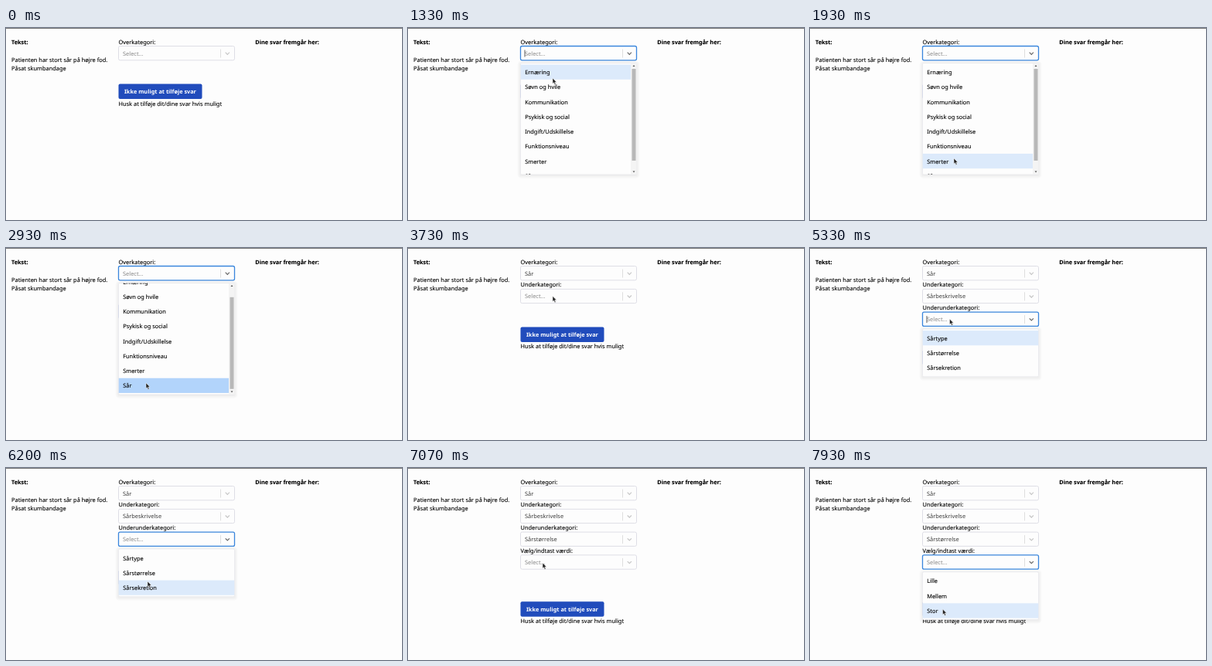
An HTML page that plays this animation: 512x249 px, repeating every 8 s.

```html
<!DOCTYPE html>
<html lang="da">
<head>
<meta charset="utf-8">
<title>Kategorivalg</title>
<style>
html, body { margin: 0; width: 100%; height: 100%; overflow: hidden; background: #fdfdfd; }
#stage { display: block; width: 100%; height: 100%; }
text { font: 7.42px "Noto Sans", "Open Sans", sans-serif; fill: #000; stroke: #000; stroke-width: .1px; text-rendering: geometricPrecision; }
.bold { font-weight: 700; font-size: 7.33px; }
.hint { fill: #868686; stroke: none; }
.value { fill: #3c3c3c; stroke: none; }
.on-button { fill: #fff; stroke: none; }
</style>
</head>
<body>
<svg id="stage" viewBox="0 0 512 249" xmlns="http://www.w3.org/2000/svg"></svg>
<script>
const LOOP = 8000;
const BLINK = 1200;
const ROW = 19.25;
const LEFT = 145.5;
const WIDTH = 150;
const PAPER = '#fdfdfd';
const stage = document.getElementById('stage');

// show: field appears, open/done: menu opens/closes, press: mouse button goes down
const fields = [
  { label: 'Overkategori:', show: 0, open: 860, press: 2860, done: 3150, pick: 7,
    options: ['Ernæring', 'Søvn og hvile', 'Kommunikation', 'Psykisk og social',
      'Indgift/Udskillelse', 'Funktionsniveau', 'Smerter', 'Sår'] },
  { label: 'Underkategori:', show: 3150, open: 3900, press: 4680, done: 4960, pick: 0,
    options: ['Sårbeskrivelse', 'Sårpleje'] },
  { label: 'Underunderkategori:', show: 4960, open: 5300, press: 6490, done: 6690, pick: 1,
    options: ['Sårtype', 'Sårstørrelse', 'Sårsekretion'] },
  { label: 'Vælg/indtast værdi:', show: 6690, open: 7100, press: LOOP, done: LOOP, pick: 2,
    options: ['Lille', 'Mellem', 'Stor'] }
].map((field, i) => ({ ...field, top: 23.5 + i * 29.8 }));

// time, x, y of the pointer tip
const path = [
  [150, 262, 150], [700, 205, 36], [950, 203, 37], [1330, 187, 65], [1930, 186, 169],
  [2250, 184, 181], [2500, 183, 181], [2800, 181, 175], [3200, 181, 175], [3750, 187, 62],
  [3950, 187, 62], [4400, 180.5, 92], [5350, 180.5, 92], [6000, 183, 147], [6220, 183, 147],
  [6430, 177, 138], [6750, 177, 138], [7000, 174, 123], [7170, 174, 123], [7780, 171.5, 183]
];

const ease = u => u * u * (3 - 2 * u);

function pointerAt(t) {
  if (t < path[0][0]) return null;
  const next = path.findIndex(key => key[0] > t);
  if (next < 0) return path[path.length - 1].slice(1);
  const [t0, x0, y0] = path[next - 1];
  const [t1, x1, y1] = path[next];
  const u = ease((t - t0) / (t1 - t0));
  return [x0 + (x1 - x0) * u, y0 + (y1 - y0) * u];
}

const text = (x, y, s, cls = '') => `<text x="${x}" y="${y}" class="${cls}">${s}</text>`;
const rect = (x, y, w, h, fill, more = '') =>
  `<rect x="${x}" y="${y}" width="${w}" height="${h}" fill="${fill}" ${more}/>`;
const line = (d, color, width) =>
  `<path d="${d}" fill="none" stroke="${color}" stroke-width="${width}"/>`;

function drawField(field, t) {
  const { top } = field;
  const open = t >= field.open && t < field.done;
  const done = t >= field.done;
  const border = open ? '#3a86dc' : '#dedee6';
  const arrow = open ? '#666' : '#c6c6c6';
  const caret = open && (t - field.open) % BLINK < BLINK / 2;
  return text(LEFT, top - 3, field.label) +
    rect(LEFT, top, WIDTH, 18.3, PAPER, `rx="2" stroke="${border}" stroke-width="${open ? 1.3 : 1}"`) +
    text(151, top + 12, done ? field.options[field.pick] : 'Select...', done ? 'value' : 'hint') +
    line(`M277.5 ${top + 4}v11`, '#d6d6d6', 0.8) +
    line(`M283.7 ${top + 8.2}l2.6 2.6l2.6-2.6`, arrow, 1.2) +
    (caret ? line(`M151 ${top + 5}v9`, '#333', 0.8) : '');
}

function drawScrollbar(height, scroll) {
  const thumb = 7.5 + scroll * 0.8;
  return rect(142.5, 0, 8, height, '#f4f4f4') +
    rect(144, thumb, 5, 119, '#b8b8b8') +
    `<path d="M145 4.5l1.5-2l1.5 2zM145 ${height - 4.5}l1.5 2l1.5-2z" fill="#555"/>`;
}

// soft shadow that falls slightly downwards
const drawShadow = (top, height) => [4, 2.5, 1].map(d =>
  rect(LEFT - d, top + 1 - d, WIDTH + 2 * d, height + 2 * d, '#000', `rx="${d + 1}" opacity=".018"`)
).join('');

function drawMenu(field, t, pointer) {
  const top = field.top + 22;
  const full = field.options.length * ROW + 4;
  const height = Math.min(full, 144.5);
  const long = full > height;
  const scroll = long && t >= 2500 ? full - height : 0;
  const inside = pointer && pointer[1] >= top && pointer[1] < top + height;
  const row = inside ? Math.floor((pointer[1] - top - 2 + scroll) / ROW) : 0;
  const hover = Math.max(0, Math.min(field.options.length - 1, row));
  const fill = t >= field.press ? '#b2d4fb' : '#dceafb';
  const rows = field.options.map((name, i) => {
    const y = 2 + i * ROW - scroll;
    return (i === hover ? rect(0, y, long ? 142.5 : WIDTH, ROW, fill) : '') +
      text(5.7, y + 12.6, name);
  }).join('');
  return drawShadow(top, height) +
    rect(LEFT, top, WIDTH, height, PAPER, 'rx="1.5" stroke="#e4e4ea" stroke-width=".6"') +
    `<svg x="${LEFT}" y="${top}" width="${WIDTH}" height="${height}" overflow="hidden">` +
    rows + (long ? drawScrollbar(height, scroll) : '') + '</svg>';
}

function drawButton(count) {
  const y = 72.5 + (count - 1) * 29.9 + (count === 4 ? 11 : 0);
  return rect(145.5, y, 108, 19.5, '#214cbc', 'rx="2"') +
    text(153, y + 12.5, 'Ikke muligt at tilføje svar', 'bold on-button') +
    text(LEFT, y + 28, 'Husk at tilføje dit/dine svar hvis muligt');
}

const drawPointer = ([x, y]) =>
  `<path transform="translate(${x} ${y})" d="M0 0v7.2l1.6-1.5l1.2 2.7l1.3-.6l-1.2-2.6h2.2z"
    fill="#222" stroke="#fff" stroke-width=".5"/>`;

function draw(t) {
  const shown = fields.filter(field => t >= field.show);
  const active = fields.find(field => t >= field.open && t < field.done);
  const pointer = pointerAt(t);
  stage.innerHTML = rect(0, 0, 512, 249, PAPER) +
    rect(0, 0, 512, 1, '#777') +
    text(7, 20.5, 'Tekst:', 'bold') +
    text(7, 43.6, 'Patienten har stort sår på højre fod.') +
    text(7, 55, 'Påsat skumbandage') +
    text(322.3, 20.5, 'Dine svar fremgår her:', 'bold') +
    drawButton(shown.length) +
    shown.map(field => drawField(field, t)).join('') +
    (active ? drawMenu(active, t, pointer) : '') +
    (pointer ? drawPointer(pointer) : '');
}

const start = performance.now();
function tick() {
  draw((performance.now() - start) % LOOP);
  requestAnimationFrame(tick);
}
tick();
</script>
</body>
</html>
```
